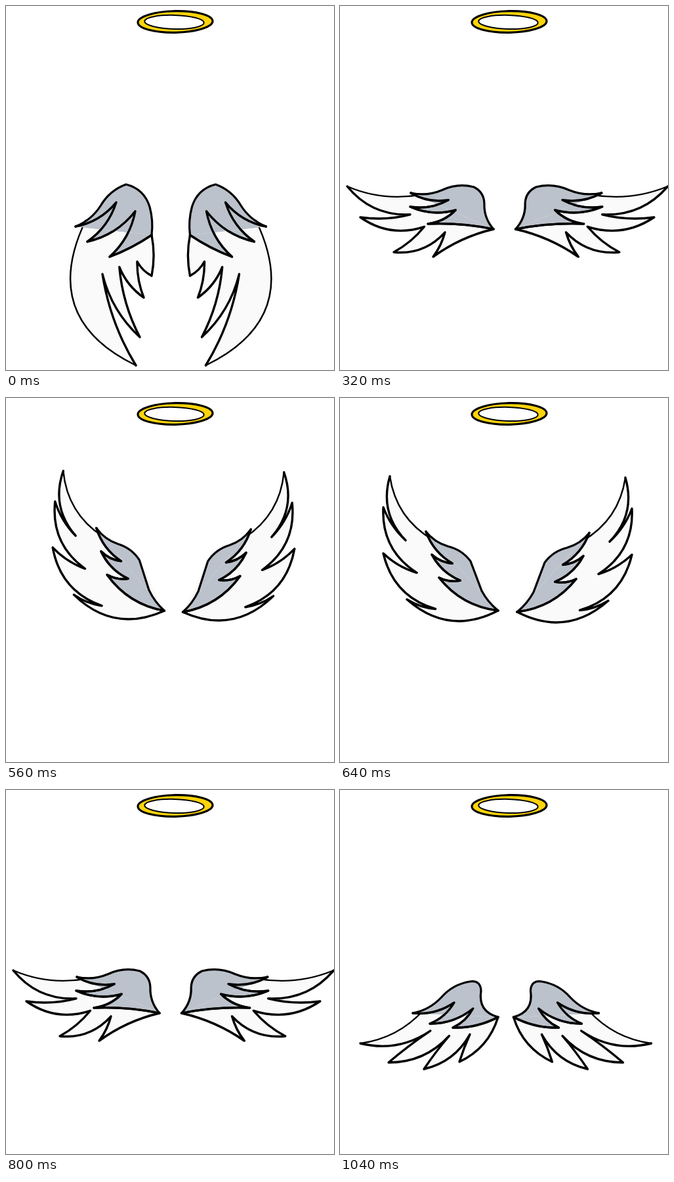
An HTML page that plays this animation: 500x553 px, repeating every 1.12 s.

```html
<!DOCTYPE html>
<html lang="en">
<head>
<meta charset="utf-8">
<title>Halo and wings</title>
<style>
  html, body { margin: 0; width: 100%; height: 100%; overflow: hidden; background: #fff; }
  svg { display: block; width: 100%; height: 100%; }
  path { fill: none; stroke: #000; stroke-width: 3.4; stroke-linejoin: round; stroke-linecap: round; }
  .lead { stroke-width: 2.4; }
  .vane { fill: #fafafa; stroke: none; }
  .coverts { fill: #bcc2cb; stroke-width: 3.2; }
</style>
</head>
<body>
<svg viewBox="0 0 500 553">
  <g stroke="#000">
    <ellipse cx="258" cy="24" rx="57" ry="16.3" fill="#fed30b" stroke-width="3.2" transform="rotate(-1 258 24)"/>
    <ellipse cx="256.5" cy="24.4" rx="45.3" ry="10.5" fill="#fff" stroke-width="2" transform="rotate(1.5 256 24)"/>
  </g>
  <g id="left"></g>
  <g id="right"></g>
</svg>
<script>
const STEP = 80;
const PIVOT = [238, 330];

// Key points of the left wing. Notches between tips are found by fan() from a bone line.
// mirror: scale, x, y and tilt of the right wing.
const folded = {
  coverts: [[106, 335], [124, 358], [158, 381]], covertBone: [[221, 250], [253, 254]],
  tips: [[198, 546], [204, 503], [210, 443], [222, 410]], bone: [[93, 290], [184, 350]],
  joint: [[183, 271], [219, 305], [222, 348]],
  bow: { lead: .5, lower: -.1, upper: .15, trail: .1, crown: -.28, hollow: -.1 },
  mirror: [1, 502.5, 0, 0]
};
const lowered = {
  coverts: [[111, 339], [137, 355], [172, 361]], covertBone: [[224, 299], [251, 306]],
  tips: [[31, 385], [74, 414], [128, 424], [182, 413]], bone: [[223, 332], [241, 324]],
  joint: [[198, 291], [215, 305], [241, 345]],
  bow: { lead: -.18, lower: .22, upper: .03, trail: .22, crown: -.55, hollow: .45 },
  mirror: [1, 505.5, 0, 0]
};
const spread = {
  coverts: [[103, 317], [125, 331], [159, 340]], covertBone: [[234, 294], [260, 301]],
  tips: [[1, 340], [40, 377], [106, 401], [167, 394]], bone: [[226, 332], [245, 311]],
  joint: [[197, 276], [214, 292], [238, 328]],
  bow: { lead: -.07, lower: .19, upper: 0, trail: .33, crown: -.6, hollow: .45 },
  mirror: [.96, 511, 13, .055]
};
const level = {
  coverts: [[108, 284], [107, 305], [134, 331]], covertBone: [[223, 295], [232, 302]],
  tips: [[11, 274], [31, 321], [82, 374], [142, 381]], bone: [[193, 336], [208, 310]],
  joint: [[204, 275], [220, 300], [234, 339]],
  bow: { lead: -.15, lower: .25, upper: -.1, trail: -.1, crown: -.3, hollow: .2 },
  mirror: [1.04, 511, 0, 0]
};
const raised = {
  coverts: [[131, 203], [140, 238], [151, 273]], covertBone: [[207, 282], [221, 299]],
  tips: [[76, 119], [66, 166], [66, 236], [102, 306]], bone: [[129, 290], [207, 370]],
  joint: [[199, 248], [216, 293], [241, 323]],
  bow: { lead: -.24, lower: .29, upper: -.12, trail: .34, crown: 0, hollow: .1 },
  mirror: [1, 511, 2, 0]
};

// Blends numbers, points, lists or whole poses.
function mix(a, b, t = .5) {
  if (typeof a === 'number') return a + (b - a) * t;
  if (Array.isArray(a)) return a.map((v, i) => mix(v, b[i], t));
  return Object.fromEntries(Object.keys(a).map(key => [key, mix(a[key], b[key], t)]));
}

function turn(wing, degrees) {
  const a = degrees * Math.PI / 180, cos = Math.cos(a), sin = Math.sin(a);
  const spin = ([px, py]) => {
    const x = px - PIVOT[0], y = py - PIVOT[1];
    return [PIVOT[0] + x * cos - y * sin, PIVOT[1] + x * sin + y * cos];
  };
  const turned = { ...wing };
  for (const key of ['coverts', 'covertBone', 'tips', 'bone', 'joint']) turned[key] = wing[key].map(spin);
  return turned;
}

// Alternates tips with notches lying halfway between each tip pair and the bone.
function fan(tips, [inner, outer]) {
  const last = tips.length - 2;
  return tips.flatMap((tip, i) => i > last ? [tip]
    : [tip, mix(mix(tip, tips[i + 1]), mix(inner, outer, i / last))]);
}

const at = point => point.map(v => v.toFixed(1)).join(' ');

// A curve whose control point stands off the chord by bow times its length.
function arc(from, to, bow) {
  const [x, y] = mix(from, to);
  const control = [x - (to[1] - from[1]) * bow, y + (to[0] - from[0]) * bow];
  return ` Q${at(control)} ${at(to)}`;
}

function plume(points, root, lower, upper, trail) {
  const edges = points.slice(1).map((p, i) => arc(points[i], p, i % 2 ? upper : lower));
  return edges.join('') + arc(points.at(-1), root, trail);
}

function draw({ coverts, covertBone, tips, bone, joint, bow }) {
  const [top, waist, root] = joint;
  const short = fan(coverts, covertBone);
  const long = fan(tips, bone);
  const start = mix(short[0], short[1], .25);
  const slope = mix(short[0], top);

  const lead = at(start) + arc(start, long[0], bow.lead);
  const edge = plume(long, root, bow.lower, bow.upper, bow.trail);
  const crest = at(short[0]) + arc(short[0], slope, .16) + arc(slope, top, -.18)
    + arc(top, waist, bow.crown) + arc(waist, root, bow.hollow);
  const fringe = plume(short, root, .18, -.17, bow.trail * .6);

  return `<path class="vane" d="M${at(top)} L${lead}${edge}Z"/>
    <path class="lead" d="M${lead}"/>
    <path d="M${at(long[0])}${edge}"/>
    <path class="coverts" stroke="none" d="M${at(short[0])}${fringe} L${at(root)}"/>
    <path class="coverts" d="M${crest}"/>
    <path d="M${at(short[0])}${fringe}"/>`;
}

const climb = [
  folded, lowered, spread,
  mix(turn(spread, 8), turn(level, -8)),
  level,
  mix(turn(level, 17), turn(raised, -17)),
  raised, turn(raised, 3)
];
const cycle = [...climb, ...climb.slice(1, -1).reverse()];

const left = document.getElementById('left');
const right = document.getElementById('right');
let shown = -1;

function render(now) {
  const index = Math.floor(now / STEP) % cycle.length;
  if (index === shown) return;
  shown = index;
  const wing = cycle[index];
  const [scale, x, y, tilt] = wing.mirror;
  left.innerHTML = right.innerHTML = draw(wing);
  right.setAttribute('transform', `matrix(${-scale} ${-tilt} ${-tilt} 1 ${x} ${y})`);
}

const start = performance.now();
function tick() {
  render(performance.now() - start);
  requestAnimationFrame(tick);
}
tick();
</script>
</body>
</html>
```
